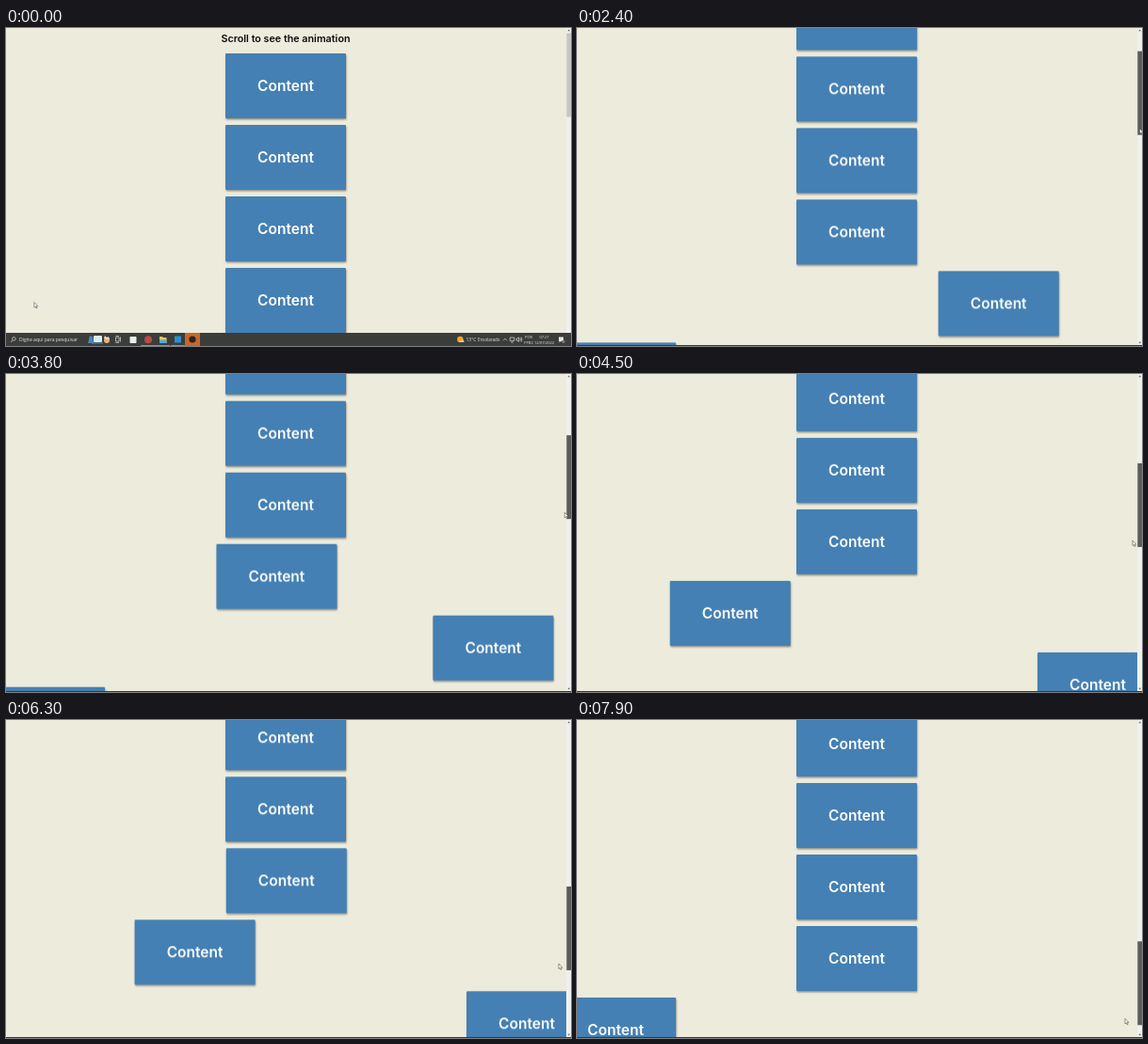
An HTML page that plays this animation: 600x338 px, repeating every 8 s.

```html
<!DOCTYPE html>
<html lang="en">
<head>
<meta charset="utf-8">
<title>Scroll animation</title>
<style>
  html, body { margin: 0; width: 100%; height: 100%; overflow: hidden; }
  body { position: relative; background: #ecebdc; font-family: Inter, "Open Sans", sans-serif; }
  #stage { position: absolute; left: 0; top: 0; width: 600px; height: 338px; overflow: hidden; }
  #page { position: absolute; left: 0; top: 0; width: 595px; will-change: transform; }
  h1 {
    position: absolute; left: 197px; top: 4px; width: 200px; margin: 0;
    font-size: 10.75px; font-weight: 600; line-height: 15px;
    text-align: center; white-space: nowrap; color: #0c0c0c;
  }
  .card {
    position: absolute; left: 233px; width: 128px; height: 69px; border-radius: 1px;
    background: #4480b3; color: #fff; box-shadow: .6px 1.4px 1.8px rgba(0, 0, 0, .38);
    font-size: 15.5px; font-weight: 600; line-height: 69px; text-align: center;
  }
  svg { position: absolute; left: 0; top: 0; }
  svg text { font-family: "Open Sans", "Noto Sans", sans-serif; fill: #e6e6e6; }
</style>
</head>
<body>
<div id="stage">
  <div id="page"><h1>Scroll to see the animation</h1></div>
  <svg width="600" height="338" viewBox="0 0 600 338">
    <rect x="595" width="5" height="338" fill="#f0f0ee"/>
    <path d="M596.3 3.2l1.4-1.7 1.4 1.7z M596.3 333.8l1.4 1.7 1.4-1.7z" fill="#666"/>
    <rect id="thumb" x="595.3" width="4.7" height="89"/>
    <rect y="337" width="600" height="1" fill="#30383c"/>
    <g id="taskbar">
      <rect y="324" width="600" height="14" fill="#3b3d3a"/>
      <g fill="none" stroke="#e0e0e0" stroke-width=".7">
        <circle cx="8.4" cy="330.4" r="1.8"/>
        <path d="M7 331.8l-2 2.2"/>
        <path d="M116.5 329h3.6v4h-3.6z M121.5 328.5v5 M116.5 327.5h3.6 M116.5 334.4h3.6"/>
        <path d="M528 332.2l2-2 2 2"/>
        <path d="M535.2 329h4.6v3.4h-4.6z M536.2 334h2.6"/>
        <path d="M542 330.2h1l1.4-1.4v4.6l-1.4-1.4h-1z M545.8 329.5q1.2 1.6 0 3.2 M547 328.6q1.8 2.5 0 5"/>
      </g>
      <text x="14" y="333.1" font-size="5.1">Digite aqui para pesquisar</text>
      <path d="M87 335l2-8 3 1 1 7z" fill="#4f83b8"/>
      <rect x="93" y="327" width="9" height="7" rx="1" fill="#dcebf5"/>
      <path d="M91 335h12" stroke="#3f9bdc"/>
      <circle cx="107" cy="332" r="3" fill="#e9b178"/>
      <path d="M104 330l1-3 2 2 2-1 1 3z" fill="#f4e2cb"/>
      <rect x="131.5" y="328" width="7" height="7" rx=".8" fill="#e9eeee"/>
      <circle cx="151" cy="331.3" r="4" fill="#b94b48"/>
      <path d="M163 328h3l1 1h3.5v6H163z" fill="#f3c44f"/>
      <path d="M163 331.5h7.5v3.5H163z" fill="#4fa9df"/>
      <rect x="179" y="327.5" width="7" height="7" fill="#2c8fd3"/>
      <rect x="190" y="324" width="16" height="14" fill="#c7682a"/>
      <circle cx="198" cy="331" r="3.6" fill="#26262a"/>
      <path d="M143 337.5h16 M159 337.5h15 M175 337.5h15" stroke="#7cb1d8" stroke-width=".8"/>
      <circle cx="482.3" cy="331" r="3.2" fill="#f5a623"/>
      <path d="M481.5 334a1.6 1.6 0 0 1 2-2 1.5 1.5 0 0 1 2.7 2z" fill="#e9c78c"/>
      <text x="488.5" y="333" font-size="5">13°C</text>
      <text x="501" y="333" font-size="4.5">Ensolarado</text>
      <g font-size="4" text-anchor="middle">
        <text x="555" y="330">POR</text>
        <text x="555" y="336">PTB2</text>
        <text x="571.5" y="330">07:27</text>
        <text x="571.5" y="336">12/07/2022</text>
      </g>
      <path d="M587 328.5h5v4.5h-3l-1.3 1.4v-1.4H587z" fill="#e8e8e8"/>
      <circle cx="592" cy="333.3" r="1.8" fill="#777"/>
    </g>
    <path id="cursor" d="M0 0v5.6l1.3-1.1.9 2 .9-.4-.9-1.9h1.7z" fill="#fff" stroke="#333" stroke-width=".5"/>
  </svg>
</div>
<script>
  const LOOP = 8000, SLIDE = 800, TRIGGER = 270;
  const FIRST = 27, PITCH = 76, COUNT = 16, HIDDEN = 256;

  // [time, scroll offset]
  const scrollSteps = [
    [0, 0], [1500, 0], [1700, 4], [2200, 61], [3000, 107.5], [3700, 213],
    [4276, 289], [4500, 339], [4660, 365], [5224, 441], [5400, 477.5],
    [5560, 517], [6012, 593], [6300, 650.5], [7100, 821], [7900, 872], [8000, 876]
  ];
  // [time, pointer x] while the thumb is held
  const pointerSteps = [
    [800, 598], [1700, 598], [3000, 597], [4500, 590], [5400, 589], [6300, 587], [7900, 582], [8000, 582]
  ];

  const $ = id => document.getElementById(id);
  const clamp = v => Math.min(1, Math.max(0, v));

  function lookup(steps, v, from = 0, to = 1) {
    let i = 1;
    while (i < steps.length - 1 && steps[i][from] < v) i++;
    const a = steps[i - 1], b = steps[i];
    const p = clamp((v - a[from]) / (b[from] - a[from]));
    return a[to] + (b[to] - a[to]) * p;
  }

  // cubic-bezier(.25, .1, .25, 1)
  function ease(p) {
    if (p <= 0 || p >= 1) return clamp(p);
    const curve = (u, c1, c2) => 3 * u * (1 - u) ** 2 * c1 + 3 * u * u * (1 - u) * c2 + u ** 3;
    let lo = 0, hi = 1;
    for (let i = 0; i < 24; i++) {
      const mid = (lo + hi) / 2;
      if (curve(mid, .25, .25) < p) lo = mid; else hi = mid;
    }
    return curve(lo, .1, 1);
  }

  const cards = Array.from({ length: COUNT }, (_, i) => {
    const el = document.createElement('div');
    const top = FIRST + PITCH * i, due = top - TRIGGER;
    el.className = 'card';
    el.textContent = 'Content';
    el.style.top = top + 'px';
    $('page').append(el);
    const last = scrollSteps[scrollSteps.length - 1][1];
    const start = due < 0 ? -SLIDE : due > last ? LOOP : lookup(scrollSteps, due, 1, 0);
    return { el, start, side: i % 2 ? -HIDDEN : HIDDEN };
  });

  function draw(t) {
    const scroll = lookup(scrollSteps, t);
    const thumbY = 5.5 + scroll * .2635;
    $('page').style.transform = `translateY(${-scroll}px)`;
    for (const { el, start, side } of cards) {
      const x = side * (1 - ease((t - start) / SLIDE));
      el.style.transform = `translateX(${x}px)`;
    }

    $('thumb').setAttribute('y', thumbY);
    $('thumb').setAttribute('fill', t < 800 ? '#c6c6c4' : t < 1300 ? '#a8a8a8' : '#5c5c5c');
    $('taskbar').style.display = t < 300 ? '' : 'none';

    const reach = ease((t - 100) / 700);
    const x = t < 800 ? 30 + 568 * reach : lookup(pointerSteps, t);
    const y = t < 800 ? 291.5 - 204 * reach : thumbY + 82;
    $('cursor').setAttribute('transform', `translate(${x} ${y})`);
  }

  const begin = performance.now();
  function tick() {
    draw((performance.now() - begin) % LOOP);
    requestAnimationFrame(tick);
  }
  tick();
</script>
</body>
</html>
```
